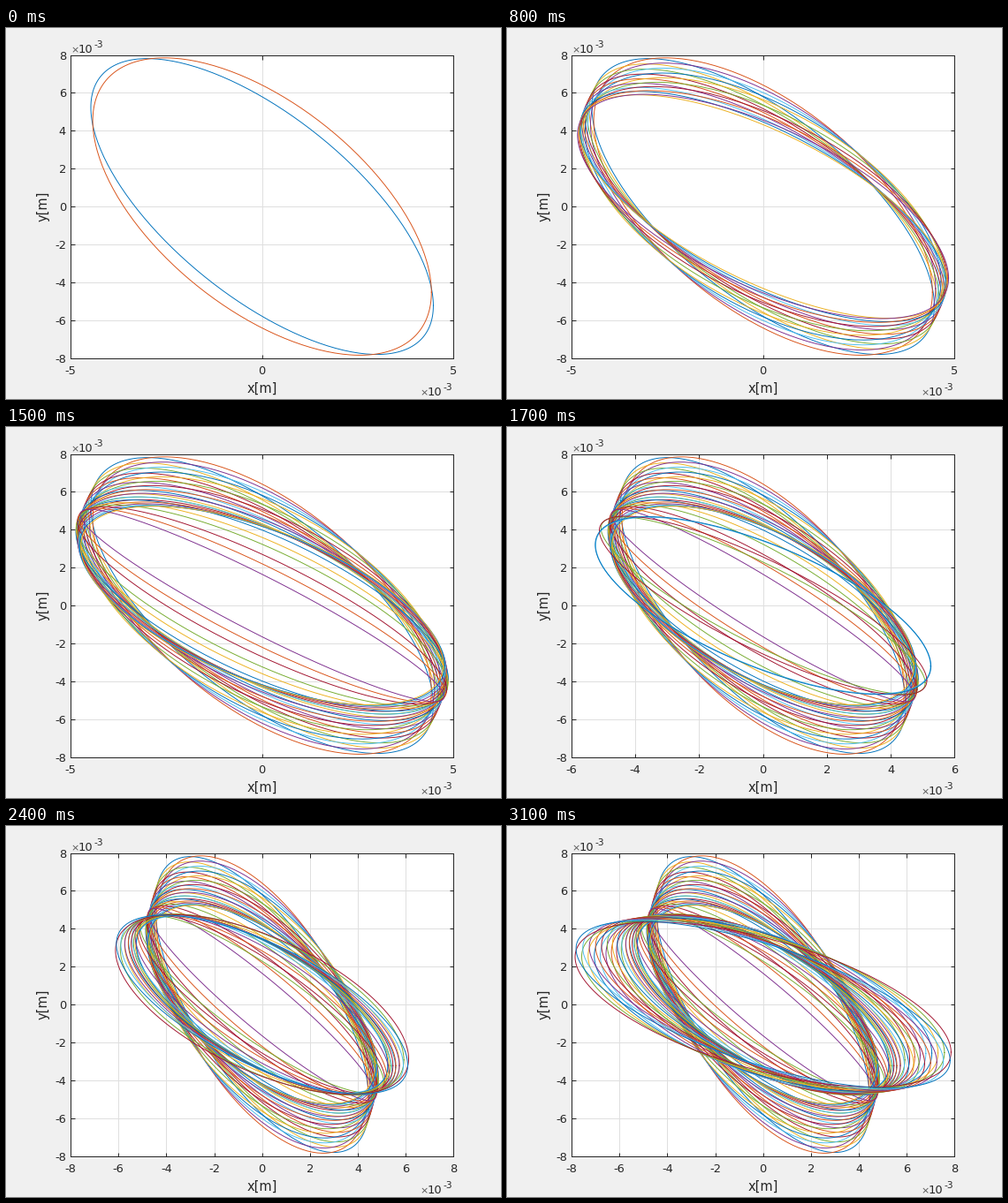
A matplotlib script that plays this animation: 560 by 420 pixels, repeating every 3200 ms.

```python
import matplotlib.pyplot as plt
import numpy as np
from matplotlib.animation import FuncAnimation

W, H, DPI = 560, 420, 100
PX = 72 / DPI
FRAMES, STEP_MS = 32, 100
INK = "#262626"
COLORS = ["#0072bd", "#d95319", "#edb120", "#7e2f8e",
          "#77ac30", "#4dbeee", "#a2142f"]

plt.rcParams.update({"font.family": "DejaVu Sans", "axes.unicode_minus": False})


def extents(step, mode):
    """Narrow and wide half axis of a mode, counted from the start of a lens."""
    if mode == 0:
        return (4.82 - 0.0035 * (step - 10) ** 2,
                np.sqrt(27.5 + 0.149 * (step - 15) ** 2))
    return (4.86 - 0.0044 * (step - 10) ** 2,
            np.sqrt(25.48 + 0.1328 * (step - 16.5) ** 2))


def shape(step, mode):
    """Half width, half height and sine of the phase lag."""
    if step < FRAMES // 2:
        width, height = extents(step, mode)
        if mode == 0:
            lag = np.interp(step, [0, 8, 12, 15], [0.742, 0.733, 0.78, 0.805])
        else:
            lag = np.interp(step, [0, 4, 8, 10, 12, 14, 15],
                            [0.817, 0.83, 0.77, 0.715, 0.61, 0.43, 0.325])
        return width, height, lag
    # the second lens mirrors the first with x and y exchanged
    back = FRAMES - 1 - step
    height, width = extents(back, 1 - mode)
    if mode == 0:
        lag = np.interp(back, [0, 4, 8, 12, 15], [0.817, 0.83, 0.79, 0.65, 0.49])
    else:
        lag = np.interp(back, [0, 8, 15], [0.742, 0.735, 0.73])
    return width, 0.985 * height, lag


def ellipse(width, height, lag):
    t = np.linspace(0, 2 * np.pi, 241)
    return (width * np.cos(t),
            height * (-np.sqrt(1 - lag ** 2) * np.cos(t) + lag * np.sin(t)))


fig = plt.figure(figsize=(W / DPI, H / DPI), dpi=DPI, facecolor="#f0f0f0")
ax = fig.add_axes([73 / W, 46.4 / H, 433.4 / W, 343 / H])
ax.set_axisbelow(True)
ax.grid(color="#dfdfdf", linewidth=PX)
ax.tick_params(direction="in", top=True, right=True, length=4.5 * PX,
               width=PX, color=INK, labelcolor=INK, labelsize=13 * PX)
ax.tick_params(axis="x", pad=8.5 * PX)
ax.tick_params(axis="y", pad=5 * PX)
for spine in ax.spines.values():
    spine.set(color=INK, linewidth=PX)
ax.set_ylim(-8, 8)
ax.set_yticks(range(-8, 9, 2))


def label(x, y, text, size, **kw):
    fig.text(x / W, 1 - y / H, text, fontsize=size * PX, color=INK, **kw)


def exponent(x, base):
    label(x, base, "×", 11, va="baseline", alpha=0.75)
    label(x + 8.5, base, "10", 13, va="baseline")
    label(x + 26, base - 6, "-3", 10.6, va="baseline")


label(290, 408, "x[m]", 14.6, ha="center", va="center")
label(42, 202, "y[m]", 14.6, ha="center", va="center", rotation=90)
exponent(73, 28)
exponent(468, 416)

lines, widths = [], []
for i in range(2 * FRAMES):
    size = shape(i // 2, i % 2)
    widths.append(size[0])
    lines += ax.plot(*ellipse(*size), color=COLORS[i % 7], linewidth=0.95 * PX)


def update(step):
    shown = 2 * (step + 1)
    for i, line in enumerate(lines):
        line.set_visible(i < shown)
    limit = next(v for v in (5, 6, 8) if max(widths[:shown]) <= v)
    ax.set_xlim(-limit, limit)
    ax.set_xticks(np.arange(-limit, limit + 1, 5 if limit == 5 else 2))
    return lines


anim = FuncAnimation(fig, update, frames=FRAMES, interval=STEP_MS,
                     init_func=lambda: update(0), repeat=True,
                     repeat_delay=0, blit=False)
plt.show()
```
